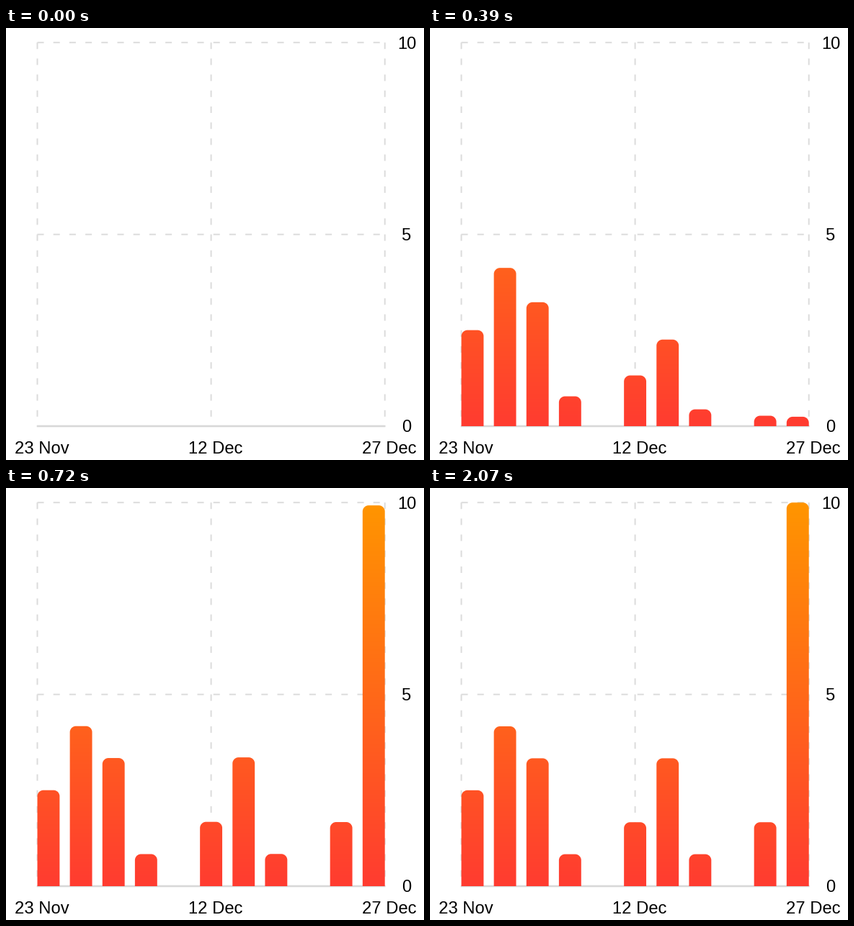
A matplotlib script for the animation above (7160 ms loop, 580x600 px).

```python
import numpy as np
import matplotlib.pyplot as plt
from matplotlib.animation import FuncAnimation

WIDTH, HEIGHT, DPI = 580, 600, 100
PT = 72 / DPI  # points per pixel

LOOP_MS, TICK_MS = 7160, 10
STEP_MS, LAST_STEP = 30, 69

LEFT, MIDDLE, RIGHT = 43.5, 284.6, 525.7
TOP, HALF, BASE = 20.2, 286.7, 553
BAR_WIDTH, RADIUS = 30.9, 8.5
COUNTS = [3, 5, 4, 1, 0, 2, 4, 1, 0, 2, 12]
PITCH = (RIGHT - LEFT - BAR_WIDTH) / (len(COUNTS) - 1)

RED = np.array([255, 59, 48])
ORANGE = np.array([255, 149, 0])
GRID = "#dcdcdc"
LINE_WIDTH, DASH, GAP = 2, 9, 13.2

OMEGA, DAMPING = 2 * np.pi / 0.275, 0.84
LEAD, STAGGER = 0.0063, 0.02


def spring(t):
    if t <= 0:
        return 0.0
    decay = DAMPING * OMEGA
    wd = OMEGA * np.sqrt(1 - DAMPING ** 2)
    return 1 - np.exp(-decay * t) * (np.cos(wd * t) + decay / wd * np.sin(wd * t))


class Bar:
    """A bar with rounded top corners showing a chart-high gradient."""

    def __init__(self, fig, slot, count):
        self.slot = slot
        self.full = (BASE - TOP) * count / max(COUNTS)
        x0 = LEFT + slot * PITCH
        col = int(x0)
        cols, rows = int(BAR_WIDTH) + 3, int(self.full * 1.02) + 4
        x = col + np.arange(cols) + 0.5
        self.y = (BASE - rows + np.arange(rows) + 0.5)[:, None]
        self.dx = np.abs(x - x0 - BAR_WIDTH / 2)[None, :] - BAR_WIDTH / 2

        mix = np.clip((BASE - self.y) / (BASE - TOP), 0, 1)
        self.pixels = np.zeros((rows, cols, 4), np.uint8)
        self.pixels[..., :3] = np.round(RED + (ORANGE - RED) * mix)[:, None, :]
        self.image = fig.figimage(self.pixels, xo=col, yo=HEIGHT - BASE,
                                  origin="upper", zorder=5)

    def update(self, seconds):
        height = self.full * spring(seconds - LEAD - STAGGER * self.slot)
        r = min(RADIUS, height)
        dx = self.dx + r
        dy = BASE - height + r - self.y
        edge = (np.hypot(np.maximum(dx, 0), np.maximum(dy, 0))
                + np.minimum(np.maximum(dx, dy), 0) - r)
        self.pixels[..., 3] = np.round(255 * np.clip(0.5 - edge, 0, 1))
        self.image.set_data(self.pixels)
        return self.image


fig = plt.figure(figsize=(WIDTH / DPI, HEIGHT / DPI), dpi=DPI, facecolor="white")
ax = fig.add_axes([0, 0, 1, 1])
ax.set_xlim(0, WIDTH)
ax.set_ylim(HEIGHT, 0)
ax.axis("off")


def grid_line(x, y):
    ax.plot(x, y, color=GRID, lw=LINE_WIDTH * PT,
            ls=(0, (DASH / LINE_WIDTH, GAP / LINE_WIDTH)),
            dash_capstyle="butt", snap=False)


def label(x, baseline, text):
    ax.text(x, baseline, text, family="Liberation Sans", size=23.8 * PT,
            color="black", ha="center", va="baseline")


for gx in (LEFT, MIDDLE, RIGHT):
    grid_line([gx, gx], [TOP, BASE])
for gy in (TOP, HALF):
    grid_line([LEFT, RIGHT], [gy, gy])
ax.plot([LEFT - 0.8, RIGHT + 0.8], [BASE, BASE], color="#d8d8d8", lw=2.6 * PT,
        solid_capstyle="butt", snap=False)

for value, gy in (("10", TOP), ("5", HALF), ("0", BASE)):
    label(556, gy + 8.4, value)
for date, cx in (("23 Nov", 49.7), ("12 Dec", 290.2), ("27 Dec", 531.5)):
    label(cx, 591, date)

bars = [Bar(fig, slot, n) for slot, n in enumerate(COUNTS) if n]


def draw(frame):
    step = min(frame * TICK_MS // STEP_MS, LAST_STEP)
    return [bar.update(step / 60) for bar in bars]


animation = FuncAnimation(fig, draw, frames=LOOP_MS // TICK_MS, interval=TICK_MS,
                          init_func=lambda: draw(0), repeat=True, repeat_delay=0,
                          blit=False, cache_frame_data=False)
plt.show()
```
